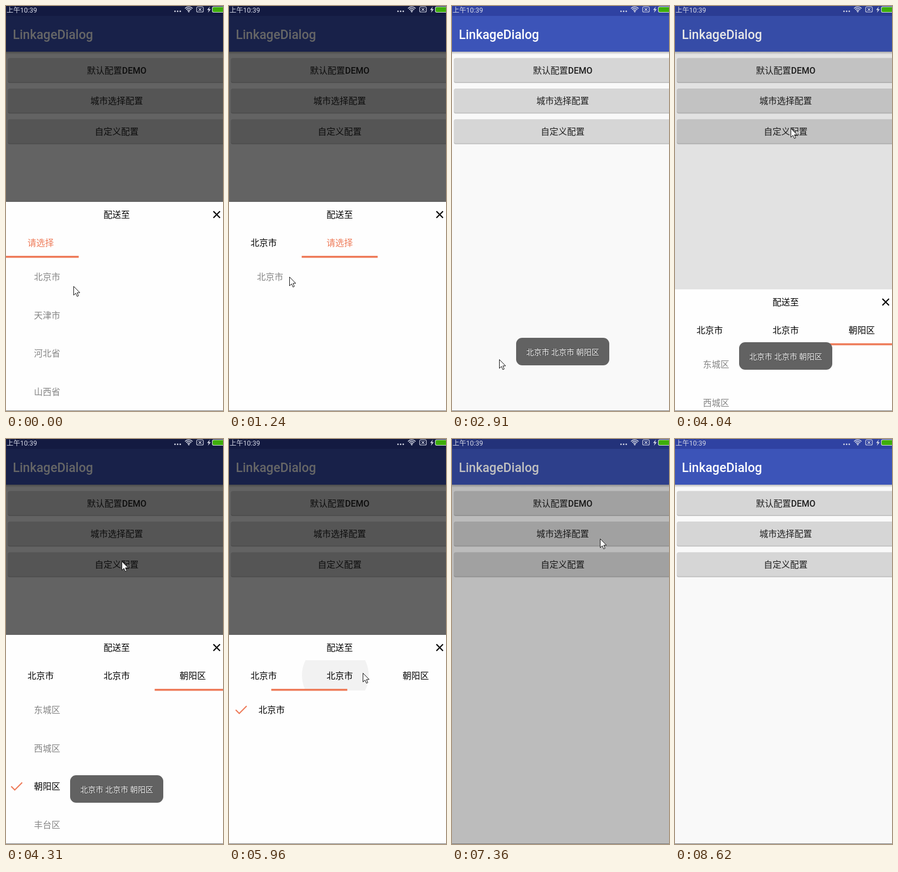
Write an HTML page with a canvas that moves like this. It is 396 by 736 pixels and loops after 8.72 s.

```html
<!DOCTYPE html>
<html lang="zh">
<head>
<meta charset="utf-8">
<title>LinkageDialog</title>
<style>
html, body { margin: 0; width: 100%; height: 100%; overflow: hidden; background: #f9f9f9; }
canvas { display: block; width: 396px; height: 736px; }
</style>
</head>
<body>
<canvas id="stage"></canvas>
<script>
const W = 396, H = 736, LOOP = 8720;
const LEFT = -6, PAGE = 416, TAB = PAGE / 3;
const ACCENT = '#ee7b59';
const FONT = 'Roboto, "Noto Sans CJK SC", "Noto Sans CJK", sans-serif';

const canvas = document.getElementById('stage');
const ctx = canvas.getContext('2d');
const dpr = window.devicePixelRatio || 1;
canvas.width = W * dpr;
canvas.height = H * dpr;

const bursts = [
  [0, 150, 2], [460, 1240, 7], [1550, 2360, 7], [2760, 2910, 2], [3030, 3610, 5],
  [3920, 4310, 4], [4440, 4900, 4], [5210, 5960, 7], [6110, 6230, 2], [6380, 6380, 1],
  [6660, 7080, 4], [7360, 7360, 1], [7510, 8380, 8], [8500, 8620, 2]
];
const ticks = bursts.flatMap(([a, b, n]) =>
  Array.from({ length: n }, (_, i) => n > 1 ? a + (b - a) * i / (n - 1) : a));

// Pointer path: [time, x, y]
const path = [
  [0, 123, 509], [150, 118, 493], [590, 118, 493], [1240, 110, 492], [1550, 110, 492],
  [2360, 86, 642], [3030, 86, 642], [3610, 211, 222], [4310, 211, 222], [4900, 76, 421],
  [5460, 76, 421], [5585, 160, 413], [5835, 244, 425], [5960, 244, 425], [6110, 265, 426],
  [6230, 307, 427], [6380, 344, 429], [6800, 344, 429], [7080, 270, 181], [7510, 270, 181],
  [8010, 316, 510], [8250, 345, 680], [8380, 367, 707], [8500, 372, 717]
];

// Page changes: [time, from, to, tapped on a tab]
const moves = [
  [340, 0, 1, false], [1430, 1, 2, false],
  [5090, 2, 0, true], [5842, 0, 1, true], [6540, 1, 2, true]
];

const pages = [
  ['北京市', '天津市', '河北省', '山西省'],
  ['北京市'],
  ['东城区', '西城区', '朝阳区', '丰台区']
];
const picks = [0, 0, 2];
const pickTimes = [340, 1430, 2642];
const OPEN = 3880, CLOSES = [2642, 7242];

const clamp = v => Math.max(0, Math.min(1, v));
const mix = (a, b, p) => a + (b - a) * p;
const easeOut = p => 1 - (1 - p) ** 5;

function fastOutSlowIn(p) {
  let lo = 0, hi = 1;
  for (let i = 0; i < 20; i++) {
    const u = (lo + hi) / 2, v = 1 - u;
    if (1.2 * v * v * u + 0.6 * v * u * u + u ** 3 < p) lo = u; else hi = u;
  }
  return 3 * (1 - lo) * lo * lo + lo ** 3;
}

function text(str, x, y, size, color, align = 'center', weight = 400) {
  ctx.font = `${weight} ${size}px ${FONT}`;
  ctx.fillStyle = color;
  ctx.textAlign = align;
  ctx.fillText(str, x, y + size * 0.37);
}

function rect(x, y, w, h, color) {
  ctx.fillStyle = color;
  ctx.fillRect(x, y, w, h);
}

function round(x, y, w, h, r, color) {
  ctx.beginPath();
  ctx.roundRect(x, y, w, h, r);
  ctx.fillStyle = color;
  ctx.fill();
}

function line(points, color, width) {
  ctx.beginPath();
  points.forEach(([x, y]) => ctx.lineTo(x, y));
  ctx.strokeStyle = color;
  ctx.lineWidth = width;
  ctx.stroke();
}

function drawMain() {
  rect(0, 0, W, H, '#f9f9f9');
  const shade = ctx.createLinearGradient(0, 83, 0, 88);
  shade.addColorStop(0, 'rgba(0,0,0,.25)');
  shade.addColorStop(1, 'rgba(0,0,0,0)');
  rect(0, 83, W, 5, shade);
  rect(0, 18, W, 65, '#3c54b8');
  rect(0, 0, W, 18, '#2f42a2');
  text('LinkageDialog', 12.5, 51, 23, '#fff', 'left', 500);
  ['默认配置DEMO', '城市选择配置', '自定义配置'].forEach((label, i) => {
    const y = 94.5 + i * 55.6;
    round(3.5, y + 0.5, 420, 45, 3, 'rgba(0,0,0,.22)');
    round(4, y, 420, 43.5, 3, '#d6d6d6');
    text(label, 202, y + 22.3, 16, '#1f1f1f', 'center', 500);
  });
}

function drawStatus() {
  const c = '#d5d8e6';
  text('上午10:39', 1, 7.2, 12.4, c, 'left');
  for (let i = 0; i < 3; i++) round(307 + i * 4.8, 8.3, 2.8, 2.8, 1.4, c);
  ctx.strokeStyle = c;
  ctx.lineWidth = 1.5;
  for (const r of [3.4, 6.4, 9.4]) {
    ctx.beginPath();
    ctx.arc(333.5, 11, r, -Math.PI * 0.76, -Math.PI * 0.24);
    ctx.stroke();
  }
  round(332.2, 9, 2.6, 2.6, 1.3, c);
  ctx.lineWidth = 1.2;
  ctx.beginPath();
  ctx.roundRect(348, 1.5, 12, 9.5, 2);
  ctx.stroke();
  line([[351.5, 3.8], [356.5, 8.8]], c, 1.2);
  line([[356.5, 3.8], [351.5, 8.8]], c, 1.2);
  ctx.beginPath();
  [[372, 1], [367, 7.3], [370, 7.3], [368.5, 12.3], [373.7, 5.7], [370.5, 5.7]]
    .forEach(([x, y]) => ctx.lineTo(x, y));
  ctx.fillStyle = c;
  ctx.fill();
  round(376, 1, 30, 11, 3, c);
  round(377, 2, 30, 9, 2.5, '#3fae0c');
}

function drawRipple(tab, age) {
  if (age < 0 || age > 400) return;
  ctx.save();
  ctx.beginPath();
  ctx.rect(LEFT + tab * TAB, 402, TAB, 55);
  ctx.clip();
  ctx.globalAlpha = clamp((400 - age) / 250);
  ctx.beginPath();
  ctx.arc(LEFT + (tab + 0.5) * TAB - 8, 429.5, Math.min(75, 29 + age * 0.27), 0, 7);
  ctx.fillStyle = '#f2f2f2';
  ctx.fill();
  ctx.restore();
}

function drawPage(i, dx, t) {
  const picked = t >= pickTimes[i];
  pages[i].forEach((name, row) => {
    const y = 492.3 + row * 69.5, on = picked && row === picks[i];
    text(name, 51 + dx, y, 16, on ? '#000' : '#858585', 'left');
    if (on) line([[9.5 + dx, y], [16 + dx, y + 6.5], [29.5 + dx, y - 7]], ACCENT, 2.2);
  });
}

function drawDialog(t, dy) {
  let page = 0, bar = 0;
  for (const [at, from, to] of moves) {
    if (t < at) break;
    page = mix(from, to, easeOut(clamp((t - at) / 186)));
    bar = mix(from, to, fastOutSlowIn(clamp((t - at) / 300)));
  }
  ctx.save();
  ctx.translate(0, dy);
  rect(0, 356, W, 380, '#fefefe');
  text('配送至', 202, 379, 16, '#000');
  line([[378.5, 373], [390.5, 385]], '#000', 2.2);
  line([[390.5, 373], [378.5, 385]], '#000', 2.2);
  for (const [at, , to, tapped] of moves) if (tapped) drawRipple(to, t - at);
  const chosen = pickTimes.filter(p => t >= p).length;
  for (let i = 0; i <= Math.min(2, chosen); i++) {
    const done = i < chosen;
    text(done ? pages[i][picks[i]] : '请选择', LEFT + (i + 0.5) * TAB, 430, 16, done ? '#000' : ACCENT);
  }
  rect(LEFT + bar * TAB, 454, TAB, 3.6, ACCENT);
  pages.forEach((_, i) => {
    const dx = (i - page) * PAGE;
    if (Math.abs(dx) < PAGE) drawPage(i, dx, t);
  });
  ctx.restore();
}

function drawToast(t) {
  const alpha = Math.min(clamp((t - 2700) / 200), clamp((4880 - t) / 180));
  if (!alpha) return;
  const y = mix(603, 611, clamp((t - 2910) / 200));
  ctx.save();
  ctx.globalAlpha = alpha;
  round(117, y, 170, 50, 11, '#626262');
  ctx.shadowColor = 'rgba(0,0,0,.6)';
  ctx.shadowBlur = 2 * dpr;
  text('北京市 北京市 朝阳区', 202, y + 25.5, 14, '#f0f0f0');
  ctx.restore();
}

function drawPointer(t) {
  if (t >= 8600) return;
  let i = path.findIndex(k => k[0] > t);
  if (i < 0) i = path.length - 1;
  const [t0, x0, y0] = path[i - 1], [t1, x1, y1] = path[i];
  const p = clamp((t - t0) / (t1 - t0));
  ctx.save();
  ctx.translate(Math.round(mix(x0, x1, p)) + 0.5, Math.round(mix(y0, y1, p)) + 0.5);
  ctx.beginPath();
  [[0, 0], [0, 16], [3.7, 12.5], [6.3, 18.3], [8.8, 17.2], [6.3, 11.5], [11.3, 11.5]]
    .forEach(([x, y]) => ctx.lineTo(x, y));
  ctx.closePath();
  ctx.fillStyle = '#fff';
  ctx.fill();
  ctx.strokeStyle = '#111';
  ctx.lineWidth = 1;
  ctx.stroke();
  ctx.restore();
}

function draw(t) {
  ctx.setTransform(dpr, 0, 0, dpr, 0, 0);
  drawMain();
  const reopened = t >= OPEN;
  const enter = reopened ? clamp((t - OPEN) / 250) : 1;
  const close = CLOSES[reopened ? 1 : 0];
  const dim = 0.6 * Math.min(enter, clamp(1 - (t - close) / 200));
  rect(0, 0, W, H, `rgba(0,0,0,${dim})`);
  drawStatus();
  if (t < close) drawDialog(t, 380 * (1 - easeOut(enter)));
  drawToast(t);
  rect(0, 735, W, 1, '#7a7a7a');
  drawPointer(t);
}

const start = performance.now();
function loop() {
  const now = (performance.now() - start) % LOOP;
  draw(ticks.findLast(k => k <= now + 0.5) || 0);
  requestAnimationFrame(loop);
}
loop();
</script>
</body>
</html>
```
